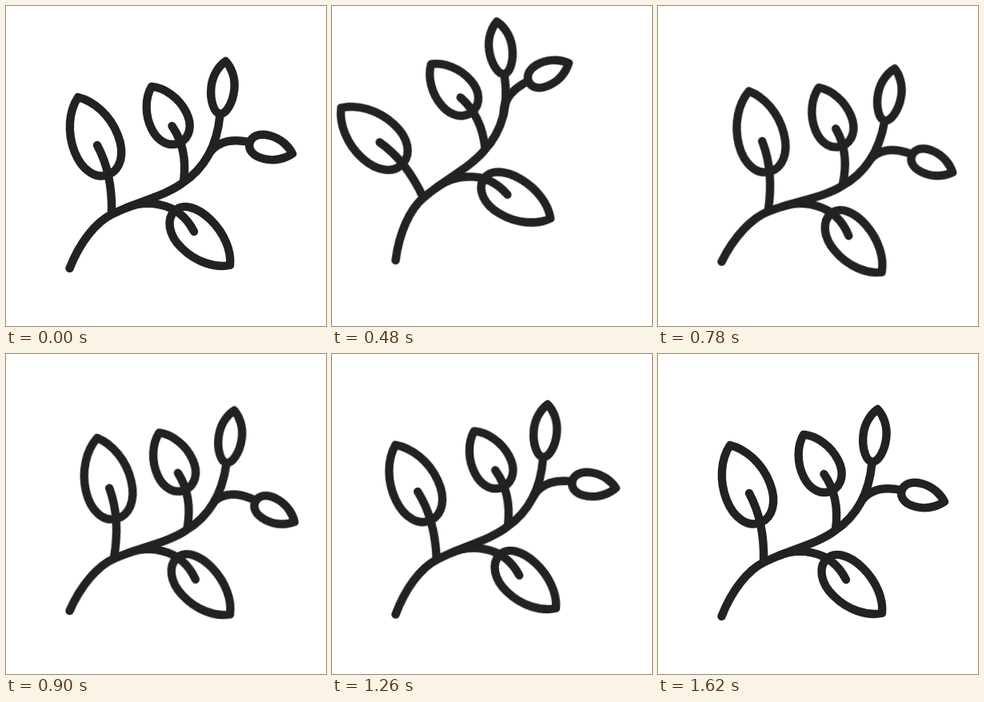
Write an HTML page that moves like this. It is 400 px wide and 400 px high and loops after 1650 ms.

```html
<!DOCTYPE html>
<html lang="en">
<head>
<meta charset="utf-8">
<title>Swaying twig</title>
<style>
  html, body { margin: 0; width: 100%; height: 100%; overflow: hidden; background: #fff; }
  svg { display: block; width: 100vw; height: 100vh; }
  .twig { fill: none; stroke: #222; stroke-width: 10.4; stroke-linecap: round; stroke-linejoin: round; }

  .lift, .sway, .flutter {
    animation: 1650ms cubic-bezier(.333, 0, .667, 1) infinite;
  }
  .lift { animation-name: lift; }
  .sway { animation-name: sway; transform-origin: 79.5px 328px; }
  .flutter { animation-name: flutter; }
  .left { --amp: -12.5deg; transform-origin: 132px 260px; }
  .right { --amp: -25deg; transform-origin: 255px 183px; }

  @keyframes lift {
    0%, 98.18%, 100% { transform: translateY(0); }
    29.09% { transform: translateY(-10px); }
  }
  @keyframes sway {
    0%, 83.64%, 100% { transform: rotate(0deg); }
    29.09% { transform: rotate(-14deg); }
    47.27% { transform: rotate(4.9deg); }
    66.67% { transform: rotate(-2.8deg); }
  }
  /* side shoots trail behind the main stem */
  @keyframes flutter {
    0%, 3.64%, 89.09%, 100% { transform: rotate(0deg); }
    34.06% { transform: rotate(calc(var(--amp) * 1.07)); }
    52.73% { transform: rotate(calc(var(--amp) * -.48)); }
    70.91% { transform: rotate(calc(var(--amp) * .27)); }
  }
</style>
</head>
<body>
<svg viewBox="0 0 400 400">
  <g class="twig lift">
    <g class="sway">
      <path d="M79.5 328C92 296 112 270 133 260C165 244 198 238 221 221C248 203 264 174 267.5 136"/>
      <path d="M150 252.5C170 244 214 240 235 282"/>
      <path d="M207.5 150C220 168 226 190 222 219"/>

      <!-- each leaf runs from its tip along +x -->
      <path transform="translate(280 324) rotate(224.5)"
        d="M0 0C11 14 33 23.5 57 23.5C80 23.5 97 14 97 0C97-15 82-27 58-27C33-27 11-16 0 0Z"/>
      <path transform="translate(182 100.7) rotate(63)"
        d="M0 0C9 14 28 24 48 24C66 24 78.5 14 78.5 0C78.5-14 66-24 48-24C28-24 9-14 0 0Z"/>
      <path transform="translate(274.5 69) rotate(96)"
        d="M0 0C6 7 18 14.5 34 14.5C52 14.5 66 7 66 0C66-7 52-14.5 34-14.5C18-14.5 6-7 0 0Z"/>

      <g class="flutter left">
        <path d="M114 174C127 198 133 228 132 260"/>
        <path transform="translate(90 114) rotate(68.5)"
          d="M0 0C12 17 36 29 62 29C88 29 104 16 104 0C104-16 88-29 62-29C36-29 12-17 0 0Z"/>
      </g>
      <g class="flutter right">
        <path d="M255 183C266 168 284 166 304 170"/>
        <path transform="translate(358 184.5) rotate(194)"
          d="M0 0C6 7 18 15 33 15C47 15 55 9 55 0C55-9 47-15 33-15C18-15 6-7 0 0Z"/>
      </g>
    </g>
  </g>
</svg>
</body>
</html>
```
